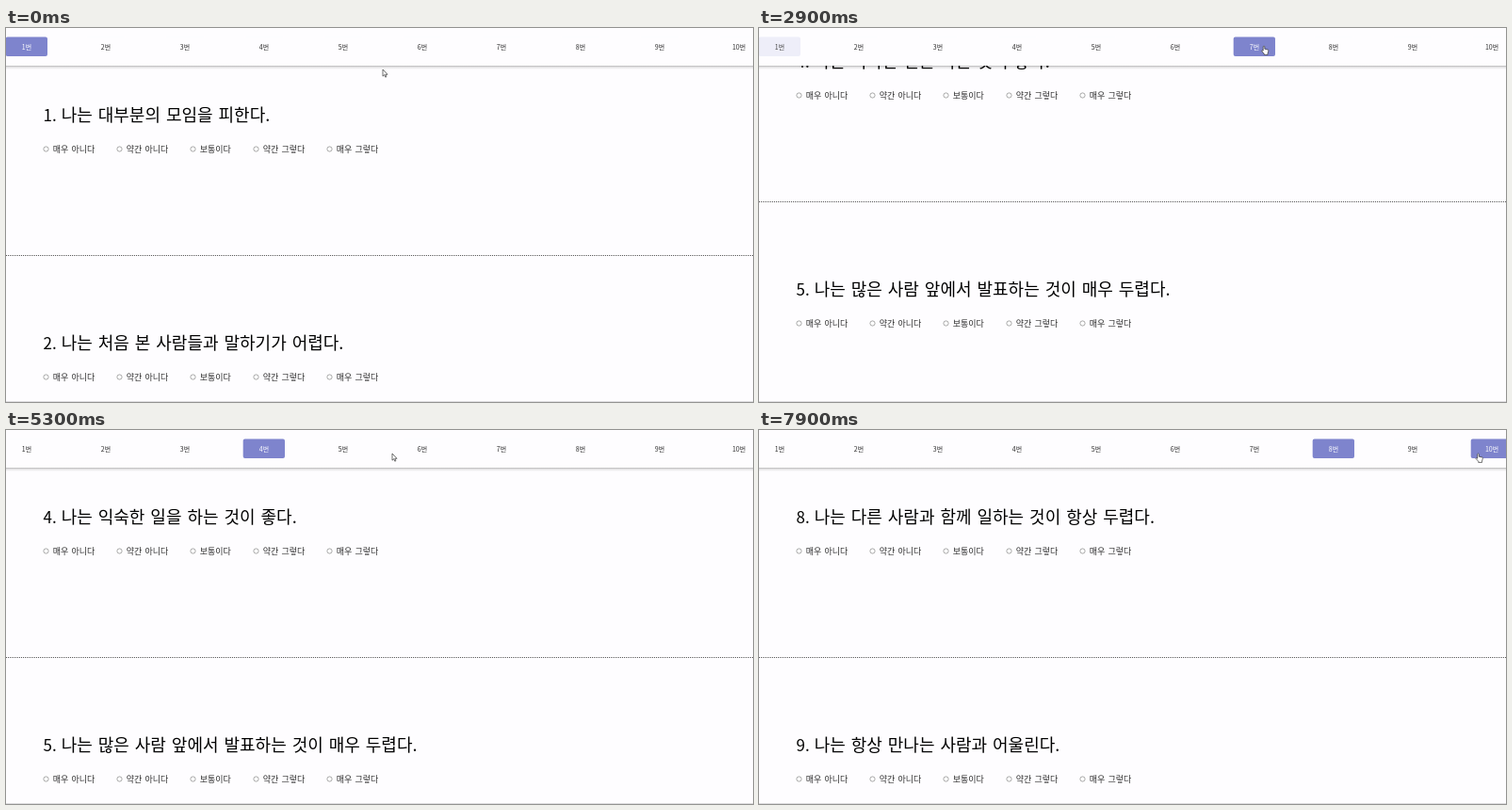
Recreate the animation shown at these times as an HTML page. Size 793x397 px, loop 8 s.

```html
<!DOCTYPE html>
<html lang="ko">
<head>
<meta charset="utf-8">
<style>
  html, body { margin: 0; width: 100%; height: 100%; overflow: hidden; background: #fefdff; }
  svg { display: block; width: 793px; height: 397px; font-family: "Noto Sans CJK KR", "Noto Sans CJK", "Noto Sans CJK JP", sans-serif; }
  .title { font-size: 18px; word-spacing: .9px; fill: #000; font-weight: 350; }
  .number { font-size: 17px; fill: #000; font-weight: 350; }
  .option { font-size: 9px; word-spacing: .7px; fill: #2c2c2c; }
  .tab { font-size: 7px; text-anchor: middle; }
</style>
</head>
<body>
<svg id="stage" viewBox="0 0 793 397">
  <defs>
    <linearGradient id="shade" x2="0" y2="1">
      <stop offset="0" stop-color="#000" stop-opacity=".28"/>
      <stop offset=".4" stop-color="#000" stop-opacity=".1"/>
      <stop offset="1" stop-color="#000" stop-opacity="0"/>
    </linearGradient>
  </defs>
  <g id="page"></g>
  <rect y="396" width="793" height="1" fill="#dedde0"/>
  <rect width="793" height="40" fill="#fefdff"/>
  <rect y="40" width="793" height="4" fill="url(#shade)"/>
  <g id="tabs"></g>
  <g id="pointer" stroke="#333" stroke-width=".7" stroke-linejoin="round" fill="#fff">
    <path id="arrow" d="M0 0V7.2L1.7 5.7L2.8 8.2L3.9 7.7L2.8 5.3H5Z"/>
    <path id="hand" d="M-.8 .6Q0-.5 .8 .6V3.2L4.2 4Q5 4.3 4.8 5.3L4 8.2V9.4H.2V8.3L-2.5 5.4Q-2.4 4.3-.8 5.2Z"/>
  </g>
</svg>
<script>
const LOOP = 8000, STEP = 100, PITCH = 242, FADE = 300;
const NS = "http://www.w3.org/2000/svg";
const $ = id => document.getElementById(id);
const clamp = v => Math.max(0, Math.min(1, v));
const smooth = v => { v = clamp(v); return v * v * (3 - 2 * v); };

function add(parent, tag, attrs, text) {
  const el = document.createElementNS(NS, tag);
  for (const key in attrs) el.setAttribute(key, attrs[key]);
  if (text) el.textContent = text;
  return parent.appendChild(el);
}

const questions = [
  "나는 대부분의 모임을 피한다.",
  "나는 처음 본 사람들과 말하기가 어렵다.",
  "나는 새로운 일을 하기가 두렵다.",
  "나는 익숙한 일을 하는 것이 좋다.",
  "나는 많은 사람 앞에서 발표하는 것이 매우 두렵다.",
  "최근 나는 자주 우울했다.",
  "최근 나는 걱정이 많아 자주 잠을 설쳤다.",
  "나는 다른 사람과 함께 일하는 것이 항상 두렵다.",
  "나는 항상 만나는 사람과 어울린다.",
  "나는 혼자 있는 것이 편하다."
];
const options = [[42.5, "매우 아니다"], [120.5, "약간 아니다"], [198.5, "보통이다"],
  [265.5, "약간 그렇다"], [343.5, "매우 그렇다"]];

questions.forEach((question, i) => {
  const g = add($("page"), "g", { transform: `translate(0 ${i * PITCH})` });
  add(g, "text", { class: "number", x: 39.5, y: 98.5 }, `${i + 1}.`);
  add(g, "text", { class: "title", x: 58.7, y: 98.5 }, question);
  for (const [x, label] of options) {
    add(g, "circle", { cx: x, cy: 128.5, r: 2.6, fill: "#fff", stroke: "#858585", "stroke-width": .7 });
    add(g, "text", { class: "option", x: x + 7.2, y: 131.7 }, label);
  }
  add(g, "path", { d: "M0 241.5H793", stroke: "#555", "stroke-dasharray": "1 1" });
});

const tabs = questions.map((_, i) => ({
  box: add($("tabs"), "rect", { x: i * 84 - .3, y: 9.5, width: 44.3, height: 20.5, rx: 2 }),
  label: add($("tabs"), "text", { class: "tab", x: 22 + i * 84, y: 22.6 }, `${i + 1}번`)
}));

// Clicks: the tab lights up on press, the page scrolls on release.
const clicks = [
  { tab: 0, press: -999, release: -999 },
  { tab: 6, press: 2520, release: 2637 },
  { tab: 3, press: 3800, release: 3990 },
  { tab: 4, press: 5500, release: 5620 },
  { tab: 7, press: 6600, release: 6700 },
  { tab: 9, press: 7700, release: 7900 }
];
const route = [[0, 400, 44], [900, 398, 60], [1600, 748, 81], [1850, 640, 50], [2200, 190, 21],
  [2350, 205, 20], [2520, 530, 20], [2900, 536, 19], [3250, 536, 19], [3800, 269, 17],
  [4400, 270, 18], [5000, 410, 25], [5300, 410, 25], [5500, 362, 20], [5750, 362, 20],
  [6300, 550, 20], [6600, 612, 20], [7100, 612, 20], [7700, 762, 25], [8000, 764, 25]];

function pointerAt(t) {
  const k = Math.max(1, route.findIndex(p => p[0] > t));
  const [t0, x0, y0] = route[k - 1], [t1, x1, y1] = route[k];
  const e = smooth((t - t0) / (t1 - t0));
  return [x0 + (x1 - x0) * e, y0 + (y1 - y0) * e];
}

function hoveredTab(t) {
  const [x, y] = pointerAt(t), i = Math.floor(x / 84);
  return y > 9 && y < 31 && x - i * 84 <= 46 ? i : -1;
}

function hoverLevel(i, t) {
  for (let age = 0; age < FADE && age <= t; age += 20)
    if (hoveredTab(t - age) === i) return 1 - age / FADE;
  return 0;
}

function activeLevel(i, t) {
  return Math.max(0, ...clicks.map((c, k) => {
    if (c.tab !== i) return 0;
    const end = clicks[k + 1] ? clicks[k + 1].release : LOOP;
    return clamp((t - c.press) / 150) * clamp(1 - (t - end) / FADE);
  }));
}

function scrollAt(t) {
  return clicks.reduce((y, c) => y + (c.tab * PITCH - y) * smooth((t - c.release) / 500), 0);
}

function mix(a, b, k) {
  return `rgb(${a.map((v, i) => Math.round(v + (b[i] - v) * k))})`;
}

function render(t) {
  $("page").setAttribute("transform", `translate(0 ${-Math.round(scrollAt(t))})`);
  tabs.forEach(({ box, label }, i) => {
    const active = activeLevel(i, t), hover = hoverLevel(i, t);
    const base = [[254, 253, 255], [230, 236, 248]];
    const rest = base[0].map((v, c) => v + (base[1][c] - v) * hover);
    box.setAttribute("fill", mix(rest, [126, 132, 205], active));
    label.setAttribute("fill", mix([45, 45, 45], [255, 255, 255], active));
  });
  const [x, y] = pointerAt(t), onTab = hoveredTab(t) >= 0;
  $("pointer").setAttribute("transform", `translate(${x.toFixed(1)} ${y.toFixed(1)})`);
  $("arrow").setAttribute("visibility", onTab ? "hidden" : "visible");
  $("hand").setAttribute("visibility", onTab ? "visible" : "hidden");
}

const start = performance.now();
function tick() {
  const t = (performance.now() - start) % LOOP;
  render(Math.floor(t / STEP) * STEP);
  requestAnimationFrame(tick);
}
tick();
</script>
</body>
</html>
```
